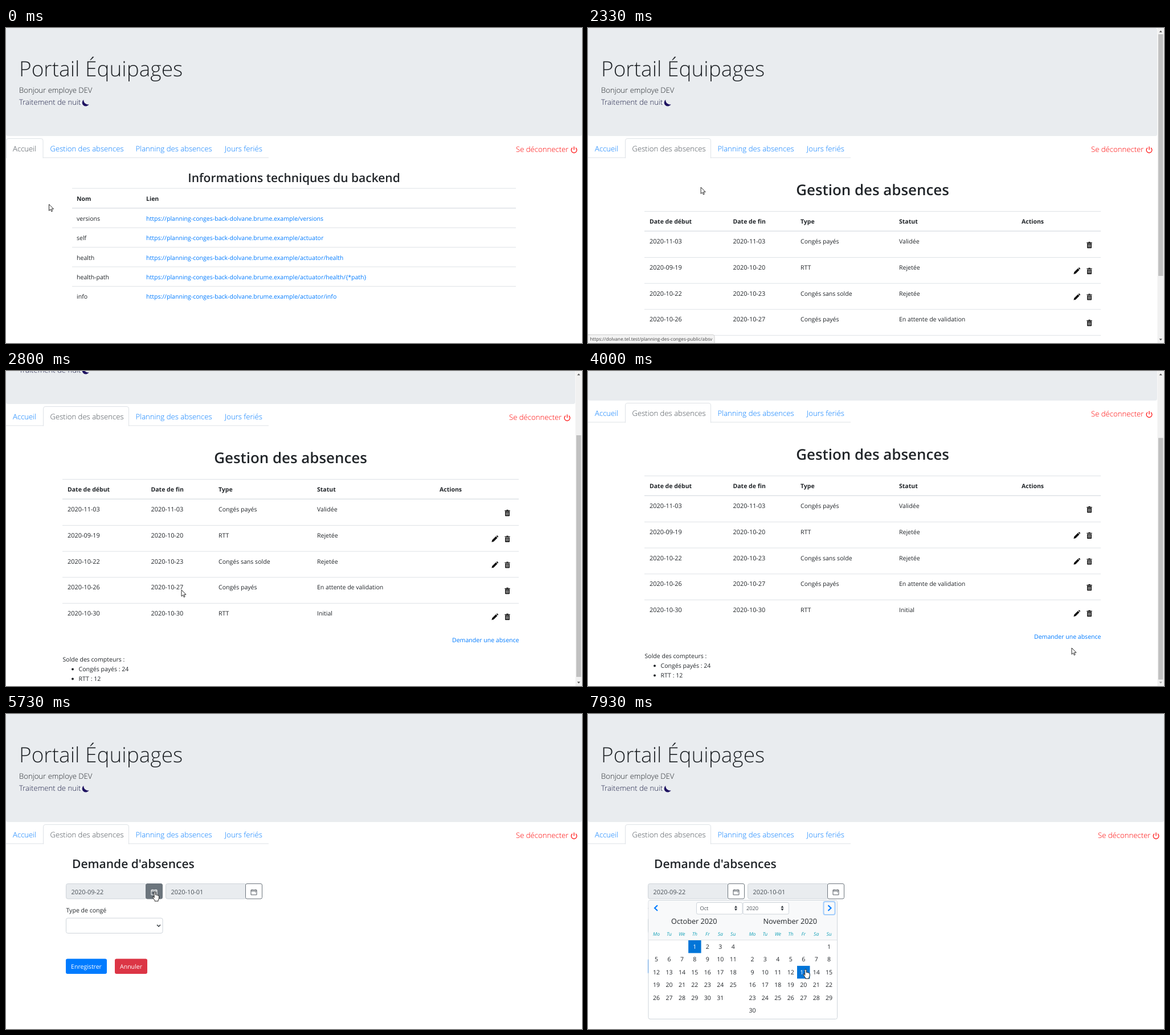
An HTML page for the animation above (8 s loop, 1011 px wide and 554 px high).

```html
<!DOCTYPE html>
<html lang="fr">
<head>
<meta charset="utf-8">
<title>Gestion des absences</title>
<style>
html, body { margin: 0; width: 100%; height: 100%; overflow: hidden; background: #fff; }
svg { display: block; position: fixed; left: 0; top: 0; }
text { font: 10.55px 'Open Sans', 'Noto Sans', sans-serif; fill: #212529; text-rendering: geometricPrecision; }
.title { font-size: 37px; font-weight: 300; }
.lead { font-size: 13.15px; font-weight: 300; }
.h1 { font-size: 25.9px; font-weight: 600; }
.h2 { font-size: 21px; font-weight: 600; }
.th { font-size: 10.5px; font-weight: 700; }
.date { font-size: 10.9px; }
.field { fill: #495057; }
.mid { text-anchor: middle; }
.link { fill: #007bff; }
.active { fill: #495057; }
.hover { fill: #0056b3; }
.under { text-decoration: underline; }
.red { fill: #f00; }
.night { fill: #1e2148; }
.white { fill: #fff; }
.tiny { font-size: 8.2px; fill: #444; }
.small { font-size: 9.2px; fill: #495057; }
.month { font-size: 12.7px; }
.week { font-size: 8.6px; font-style: italic; fill: #17a2b8; }
.line { stroke: #dee2e6; fill: none; }
.box { stroke: #ced4da; fill: #fff; }
.grey { fill: #e9ecef; }
.chev { fill: none; stroke: #007bff; stroke-width: 2.1; }
.chev.off { stroke: #9a9fa4; }
.chev.dark { stroke: #0060cc; }
.blue { fill: #0275d8; }
.range { fill: #80baeb; }
.focus { fill: none; stroke: #000; stroke-width: 1.8; }
.btn { fill: #fff; stroke: #6c757d; }
.cal { fill: none; stroke: #545b62; }
.btn.on { fill: #6c757d; }
.cal.on { stroke: #fff; }
</style>
</head>
<body>
<svg id="stage" width="1011" height="554" viewBox="0 0 1011 554" xmlns="http://www.w3.org/2000/svg"></svg>
<script>
const text = (x, y, s, cls = '', id = '') => `<text x="${x}" y="${y}" class="${cls}" id="${id}">${s}</text>`;
const rect = (x, y, w, h, cls = '', r = 0, id = '') =>
  `<rect x="${x}" y="${y}" width="${w}" height="${h}" rx="${r}" class="${cls}" id="${id}"/>`;
const path = (d, attrs = '') => `<path d="${d}" ${attrs}/>`;
const at = (x, y, s) => `<g transform="translate(${x} ${y})">${s}</g>`;
const group = (id, ...parts) => `<g id="${id}">${parts.join('')}</g>`;
const rule = (x1, x2, y, w = 1) => path(`M${x1} ${y}H${x2}`, `class="line" stroke-width="${w}"`);

// Header and tabs
const tab = (x, w, id, fill, stroke) =>
  path(`M${x} 229V198Q${x} 194.5 ${x + 3.5} 194.5H${x + w - 3.5}Q${x + w} 194.5 ${x + w} 198V229`,
    `id="${id}" fill="${fill}" stroke="${stroke}"`);
const moon = path('M-3.2 -6A6.4 6.4 0 1 0 6.2 2.2A7.5 7.5 0 0 1 -3.2 -6Z', 'fill="#1d1160"');
const power = path('M-2.9 -4A4.9 4.9 0 1 0 2.9 -4M0 -6.2V-.4', 'fill="none" stroke="#f00" stroke-width="1.2"');

const header = group('header',
  rect(0, 0, 1011, 190, 'grey', 3.5, 'banner'),
  text(23, 85, 'Portail Équipages', 'title'),
  text(23, 114, 'Bonjour employe DEV', 'lead'),
  text(23, 135, 'Traitement de nuit', 'lead night'),
  at(139.5, 132, moon),
  tab(65.5, 150, 'tabHover', 'none', '#e9ecef'),
  rule(0, 461, 228),
  tab(.5, 64.5, 'tab0', '#fff', '#dee2e6'),
  tab(65.5, 150, 'tab1', '#fff', '#dee2e6'),
  text(12, 217, 'Accueil', 'lead', 'nav0'),
  text(77.5, 217, 'Gestion des absences', 'lead', 'nav1'),
  text(227.5, 217, 'Planning des absences', 'lead link'),
  text(384, 217, 'Jours feriés', 'lead link'),
  group('logout', text(895, 218, 'Se déconnecter', 'lead red'), at(997, 214.7, power)));

// Home page
const host = 'https://planning-conges-back-dolvane.brume.example/';
const links = [['versions', 'versions'], ['self', 'actuator'], ['health', 'actuator/health'],
  ['health-path', 'actuator/health/{*path}'], ['info', 'actuator/info']];
const home = group('home',
  text(505.5, 271, 'Informations techniques du backend', 'h2 mid'),
  rule(116, 895, 282), rule(116, 895, 316.7, 1.5),
  text(124, 303.5, 'Nom', 'th'), text(246, 303.5, 'Lien', 'th'),
  ...links.map(([name, end], i) => {
    const y = 338.8 + i * 34.35;
    return text(124, y, name) + text(246, y, host + end, 'link') + (i < 4 ? rule(116, 895, 351.3 + i * 34.35) : '');
  }));

// Absence list
const trash = path('M-4.6 -4.6H-1.6V-5.6H1.6V-4.6H4.6V-3.2H-4.6ZM-4 -2.6H4V4.6Q4 5.6 3 5.6H-3Q-4 5.6 -4 4.6Z', 'fill="#111"') +
  path('M-2 -1.4V4.2M0 -1.4V4.2M2 -1.4V4.2', 'stroke="#fff" stroke-width=".8"');
const pencil = path('M-5.6 5.6L-4.7 2L1.9 -4.5L4.5 -1.9L-2 4.7ZM2.6 -5.1L3.8 -6Q6.2 -5.4 6 -3.8L5.1 -2.6Z', 'fill="#111"');
const absences = [
  ['2020-11-03', '2020-11-03', 'Congés payés', 'Validée'],
  ['2020-09-19', '2020-10-20', 'RTT', 'Rejetée', 1],
  ['2020-10-22', '2020-10-23', 'Congés sans solde', 'Rejetée', 1],
  ['2020-10-26', '2020-10-27', 'Congés payés', 'En attente de validation'],
  ['2020-10-30', '2020-10-30', 'RTT', 'Initial', 1]];
const cols = [108, 254.5, 373, 546, 761];
const list = group('list',
  text(499.5, 294, 'Gestion des absences', 'h1 mid'),
  rule(99, 900, 322.5), rule(99, 900, 357.3, 1.5),
  ...['Date de début', 'Date de fin', 'Type', 'Statut', 'Actions'].map((s, i) => text(cols[i], 344, s, 'th')),
  group('rows', ...absences.map((row, i) => {
    const y = 379.3 + i * 45.7;
    return row.slice(0, 4).map((s, k) => text(cols[k], y, s, k < 2 ? 'date' : '')).join('') +
      at(880, y + 2.3, trash) + (row[4] ? at(858, y + 2.3, pencil) : '') +
      (i < 4 ? rule(99, 900, y + 24.2) : '');
  })),
  group('foot',
    text(783, 609.3, 'Demander une absence', 'link', 'ask'),
    text(99.5, 643, 'Solde des compteurs :'),
    ...['Congés payés : 24', 'RTT : 12'].map((s, i) =>
      `<circle cx="117" cy="${656.5 + i * 17}" r="2" fill="#212529"/>` + text(127.5, 660 + i * 17, s))));

// Request form
const calIcon = path('M-5 -3.5H5V5H-5ZM-5 -1.6H5M-3 -3.5V-4.6M3 -3.5V-4.6M2 .2H3.4', 'class="cal"');
const dateField = (x, s) =>
  rect(x, 298.5, 141, 26.5, 'box grey', 3) + text(x + 9, 317, s, 'date field') +
  rect(x + 140, 298.5, 29, 26.5, 'btn', 2.5) + at(x + 154.5, 313, calIcon);
const form = group('form',
  text(116, 271, "Demande d'absences", 'h2'),
  group('from', dateField(105.5, '2020-09-22')),
  dateField(280.5, '2020-10-01'),
  text(105.5, 349, 'Type de congé'),
  rect(105.5, 359, 169.5, 26.5, 'box', 3),
  path('M265 370.8L268 373.8L271 370.8', 'fill="none" stroke="#343a40" stroke-width="1.5"'),
  rect(105, 430.5, 72, 26.5, 'link', 3), text(141, 447.7, 'Enregistrer', 'white mid'),
  rect(191, 430.5, 57, 26.5, '', 3, 'cancel'), text(219.5, 447.7, 'Annuler', 'white mid'));

// Date picker
const CELL = 22.45, TOP = 398, LEFT = 108.8, RIGHT = 277.2;
const day = (x, y, n, mark) => (mark ? rect(x, y, CELL, CELL, mark) : '') +
  text(x + CELL / 2, y + 15, n, mark ? 'white mid' : 'mid');
function month(x, name, first, count, mark = () => '') {
  let s = text(x + 77.5, 369.3, name + ' 2020', 'month mid');
  for (let n = 1; n <= count; n++) {
    const i = n + first - 1;
    s += day(x + i % 7 * CELL, TOP + Math.floor(i / 7) * CELL, n, mark(n));
  }
  return s;
}
const firstOnly = n => n === 1 ? 'blue' : '';
const focusBox = (x, y) => rect(x + .6, y + .6, CELL - .6, CELL - .6, 'focus', 2);
const picker = (x, id, s) => rect(x, 331.5, 80.5, 20.5, 'box', 2.5) + text(x + 6, 345.3, s, 'small', id) +
  path(`M${x + 66.5} 340.7L${x + 69} 337L${x + 71.5} 340.7ZM${x + 66.5} 342.3L${x + 69} 346L${x + 71.5} 342.3Z`, 'fill="#343a40"');
const week = ['Mo', 'Tu', 'We', 'Th', 'Fr', 'Sa', 'Su'];
const popup = group('popup',
  rect(106, 327.5, 331.5, 209, 'box', 3),
  rect(106.5, 328, 330.5, 69.5, '', 2.5, 'head'),
  rule(106.5, 437, 397.5),
  path('M122 336.5L117 341.3L122 346.1', 'id="prev"'),
  rect(413.5, 330, 20, 23, '', 3, 'ring'),
  path('M421.5 336.5L426.5 341.3L421.5 346.1', 'id="next"'),
  picker(190.5, 'pick', 'Sep'), picker(272, '', '2020'),
  ...[LEFT, RIGHT].flatMap(x => week.map((s, i) => text(x + (i + .5) * CELL, 389.5, s, 'week mid'))),
  group('before',
    month(LEFT, 'September', 1, 30, n => n === 22 ? 'blue' : n > 22 ? 'range' : ''),
    focusBox(LEFT + CELL, TOP + 3 * CELL),
    month(RIGHT, 'October', 3, 31, firstOnly)),
  group('after', month(LEFT, 'October', 3, 31, firstOnly), month(RIGHT, 'November', 6, 30)),
  group('over', rect(0, 0, CELL, CELL, 'blue'), text(CELL / 2, 15, '', 'white mid', 'overDay'),
    group('overFocus', focusBox(0, 0))));

// Browser parts and pointer
const bar = group('bar',
  rect(999.5, 0, 11.5, 554, '', 0, 'track'), rect(1001, 11, 8.5, 425, '', 0, 'thumb'),
  path('M1002.6 7.5L1005.2 4.5L1007.8 7.5Z', 'fill="#505050"'),
  path('M1002.6 546.5L1005.2 549.5L1007.8 546.5Z', 'id="down"'));
const status = group('status',
  path('M-1 539.5H219Q222 539.5 222 542.5V556H-1Z', 'fill="#f3f3f3" stroke="#cfcfcf"'),
  text(3.5, 549.7, '', 'tiny', 'url'));
const pointer = group('pointer',
  path('M0 0V11.3L2.6 8.9L4.3 12.8L6.1 12L4.4 8.2H8Z', 'id="arrow" fill="#fff" stroke="#111" stroke-width=".9"'),
  path('M-1.3 10.5V1.2Q-1.2 0 0 0T1.3 1.2V5.6Q2.4 4.8 3.4 5.9Q4.6 5.3 5.4 6.6Q7 6.2 7.2 8V11.5L5.8 14.5V16.5H-.3V15L-4 9.8Q-4.2 8 -2.6 8.3Z',
    'id="hand" fill="#fff" stroke="#111" stroke-width=".9"'));

const stage = document.getElementById('stage');
stage.innerHTML = group('page', header, home, list, form, popup) + bar + status + pointer;
const $ = id => document.getElementById(id);
$('cancel').setAttribute('fill', '#dc3545');
$('head').setAttribute('fill', '#f8f9fa');
$('track').setAttribute('fill', '#f1f1f1');
$('thumb').setAttribute('fill', '#c1c1c1');
$('ring').setAttribute('style', 'fill:#f8f9fa;stroke:#a3cdfb;stroke-width:2');

const show = (id, on) => { $(id).style.display = on ? '' : 'none'; };
const cls = (id, c) => $(id).setAttribute('class', c);
const move = (id, x, y) => $(id).setAttribute('transform', `translate(${x} ${y})`);
const within = (t, spans) => spans.some(([a, b]) => t >= a && t < b);

// time, x, y of the pointer's hot spot
const route = [
  [0, 75.5, 310], [400, 75.5, 310], [600, 80, 285], [800, 95, 250], [1000, 115, 222], [1267, 128, 206],
  [2000, 128, 206], [2133, 150, 232], [2333, 222, 304], [2533, 280, 362], [2733, 305, 383], [2800, 308, 385],
  [3133, 308, 385], [3333, 400, 425], [3533, 580, 480], [3733, 760, 503], [3867, 830, 500], [4000, 849, 487],
  [4267, 862, 465], [4400, 862, 465], [4667, 871.5, 470], [4867, 700, 440], [5067, 420, 370], [5267, 290, 330],
  [5600, 261, 312], [6133, 264, 317], [6333, 330, 332], [6600, 429, 348], [7000, 428, 347],
  [7267, 423, 395], [7533, 399, 437], [7733, 382, 449], [8000, 382, 449]];
const hands = [[1000, 2200], [4130, 4460], [5530, 6260], [6530, 7130], [7330, 8000]];
const wheel = [0, 12, 40, 74, 101, 120, 132, 136.5, 138];

function pointerAt(t) {
  const i = Math.max(1, route.findIndex(p => p[0] > t));
  const [a, b] = [route[i - 1], route[i]];
  const k = (t - a[0]) / (b[0] - a[0]);
  return [a[1] + (b[1] - a[1]) * k, a[2] + (b[2] - a[2]) * k];
}

function draw(t) {
  const onHome = t < 1660, onForm = t >= 4460, onList = !onHome && !onForm;
  const loaded = onList && t >= 1795, tall = loaded;
  const scroll = onList ? wheel[Math.max(0, Math.min(8, Math.round((t - 2400) / 66.667)))] : 0;
  const [x, y] = pointerAt(t);

  move('page', 0, -scroll);
  $('banner').setAttribute('width', tall ? 999 : 1011);
  move('logout', tall ? -12 : 0, 0);
  show('tab0', onHome);
  show('tab1', !onHome);
  const tabOver = onHome && t >= 1000;
  show('tabHover', tabOver);
  cls('nav0', 'lead ' + (onHome ? 'active' : 'link'));
  cls('nav1', 'lead ' + (!onHome ? 'active' : tabOver ? 'hover' : 'link'));

  show('home', onHome);
  show('list', onList);
  move('list', tall ? 0 : 6, 0);
  show('rows', loaded);
  move('foot', 0, loaded ? 0 : -228.5);
  cls('ask', t >= 4130 ? 'hover under' : 'link');
  show('bar', tall);
  $('thumb').setAttribute('y', 11 + scroll * .773);
  $('down').setAttribute('fill', scroll === 138 ? '#a3a3a3' : '#505050');

  show('form', onForm);
  const btnOver = within(t, [[5530, 6260]]) ? ' on' : '';
  $('from').querySelector('.btn').setAttribute('class', 'btn' + btnOver);
  $('from').querySelector('.cal').setAttribute('class', 'cal' + btnOver);

  const turned = t >= 6730;
  show('popup', t >= 5730);
  show('before', !turned);
  show('after', turned);
  show('ring', turned);
  $('pick').textContent = turned ? 'Oct' : 'Sep';
  cls('prev', turned ? 'chev' : 'chev off');
  cls('next', within(t, [[6530, 7130]]) ? 'chev dark' : 'chev');

  const col = Math.floor((x - RIGHT) / CELL), row = Math.floor((y - TOP) / CELL);
  const n = row * 7 + col - 5;
  const over = turned && row >= 0 && n > 0;
  show('over', over);
  if (over) {
    move('over', RIGHT + col * CELL, TOP + row * CELL);
    $('overDay').textContent = n;
  }
  show('overFocus', t >= 7925);

  show('status', within(t, [[1395, 2460], [4460, 4930]]));
  $('status').style.opacity = onHome ? Math.min(1, (t - 1333) / 200) : 1;
  $('url').textContent = 'https://dolvane.tel.test/planning-des-conges-public/abs' + (onForm ? 'd' : 'v');

  const hand = within(t, hands);
  show('hand', hand);
  show('arrow', !hand);
  move('pointer', x, y);
}

// The screen refreshes 15 times a second
const start = performance.now(), STEP = 1000 / 15;
function tick() {
  const t = (performance.now() - start) % 8000;
  draw(Math.floor(t / STEP + .01) * STEP);
  requestAnimationFrame(tick);
}
tick();
</script>
</body>
</html>
```
